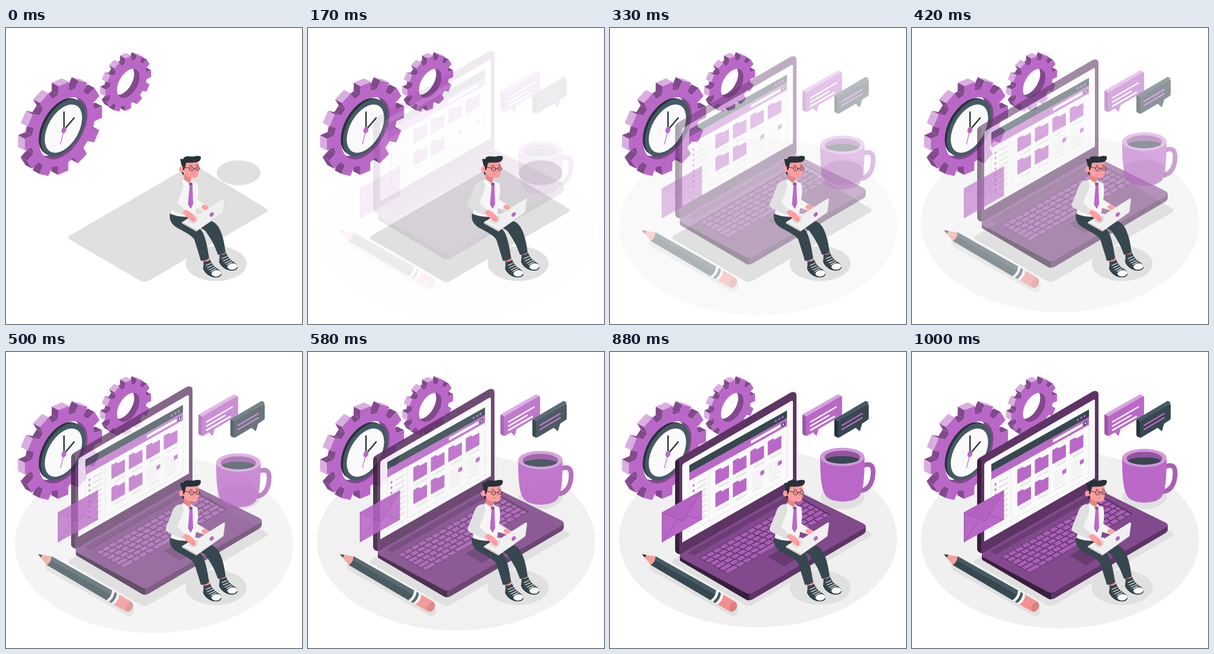
An HTML page that plays this animation: 500x500 px, repeating every 1.04 s.

```html
<!DOCTYPE html>
<html lang="en">
<head>
<meta charset="utf-8">
<title>Working on a laptop</title>
<style>
  html, body { margin: 0; width: 100%; height: 100%; overflow: hidden; background: #fff; }
  svg { display: block; width: 100%; height: 100%; }
  .line { fill: none; stroke-linecap: round; stroke-linejoin: round; }
</style>
</head>
<body>
<svg viewBox="0 0 500 500">
  <ellipse class="up" cx="250" cy="317" rx="235" ry="150" fill="#f0f0f0"/>

  <g fill="#e0e0e0">
    <path d="M107 351 L309 234 Q316 230 323 234 L440 305 Q444 308 440 311 L241 427 Q234 431 227 427 L107 357 Q103 354 107 351Z"/>
    <ellipse cx="393" cy="244.500" rx="37" ry="21"/>
    <ellipse cx="355" cy="398" rx="51.500" ry="29.500"/>
  </g>

  <g id="gears"></g>

  <g id="clock">
    <circle r="43" transform="matrix(.866 -.5 0 1 92.500 166.500)" fill="#263238"/>
    <circle r="43.500" transform="matrix(.866 -.5 0 1 96.500 168.500)" fill="#455a64"/>
    <circle r="36.500" transform="matrix(.866 -.5 0 1 97 170)" fill="#fafafa"/>
    <path class="line" d="M98 172 V142 M98 172 L115 152" stroke="#263238" stroke-width="2.400"/>
    <path class="line" d="M98 172 L92 196" stroke="#ba68c8" stroke-width="1.200"/>
    <ellipse cx="98" cy="172.500" rx="4" ry="5.500" transform="rotate(20 98 172)" fill="#ba68c8"/>
  </g>

  <g class="down">
    <path d="M110 187 Q110 181 115 178 L303 68 Q309 64 313 67 Q315 68 315 72 V230 L121 341 L115 339 Q110 337 110 332Z" fill="#5d3464"/>
    <path d="M110 187 Q110 182 113 180 L117 183 V340 L115 339 Q110 337 110 332Z" fill="#381f3c"/>
    <path d="M122 192 Q122 188 125 186 L306 81 Q309 79 309 83 V213 L122 320Z" fill="#fafafa"/>
    <g id="window" transform="matrix(1 -.56 0 1 134 189.400)"></g>
    <g transform="translate(0 -1)">
      <path d="M118 344 V350 Q118 352 122 354 L229 417 Q235 420 241 417 L428 307 Q432 304 432 301 V293Z" fill="#5d3464"/>
      <path d="M118 344 V350 Q118 352 122 354 L229 417 Q232 419 235 419 V405Z" fill="#381f3c"/>
      <path d="M122 339 L310 231 L428 289 Q436 294 428 298 L241 406 Q235 409 229 406 L121 348 Q114 343 122 339Z" fill="#82498c"/>
      <path d="M132 338 L308 237 L317 242 L142 343Z" fill="#6c3d75"/>
      <path d="M266 345 L304 323 L332 338 L294 361Z" fill="#683a70"/>
      <g id="keys" transform="matrix(1 -.575 1 .5625 151 347)"></g>
    </g>
  </g>

  <g class="fade">
    <path d="M88 271 L155 234 V283 L88 321Z" fill="#ba68c8" stroke="#ba68c8" stroke-linejoin="round"/>
    <path d="M88 271 L124 286 L155 234Z" fill="#b462c2"/>
    <path class="line" d="M90 272 L120 285 Q124 286 126 283 L155 235 M89 320 L114 283 M155 283 L130 276 M88.500 271 V321" stroke="#8d4f98" stroke-width=".8"/>
  </g>

  <g class="fade">
    <path d="M326 105 L384 72 Q386 71 391 74 L331 110Z" fill="#d6a4de"/>
    <path d="M325 107 Q325 105 327 106 L332 110 V142 L327 140 Q325 139 325 137Z" fill="#9b55a8"/>
    <path d="M341 134 L353 128 L349 142Z" fill="#ba68c8"/>
    <path d="M331 112 Q331 110 333 108 L389 75 Q392 74 392 77 V105 Q392 107 390 108 L334 141 Q331 143 331 140Z" fill="#ba68c8"/>
    <path class="line" d="M339 118 L382 93 M339 125 L370 107 M339 132 L379 109" stroke="#fff" stroke-width="2.600"/>
    <path d="M380 113 L431 83 Q433 82 437 86 L385 118Z" fill="#455a64"/>
    <path d="M379 115 Q379 113 381 114 L386 118 V145 L381 143 Q379 142 379 140Z" fill="#263238"/>
    <path d="M385 120 Q385 117 387 116 L434 88 Q437 86 437 90 V112 Q437 114 435 115 L426 121 L422 134 L415 128 L388 144 Q385 146 385 143Z" fill="#37474f"/>
    <path class="line" d="M392 124 L426 104 M392 131 L426 111" stroke="#ba68c8" stroke-width="2.400"/>
  </g>

  <g class="fade">
    <path class="line" d="M75 362 L208 437" stroke="#e0e0e0" stroke-width="18"/>
    <g transform="translate(54 341.500) rotate(30)">
      <path d="M0 0 L22 -8.500 Q26 0 22 8.500Z" fill="#f5a09a"/>
      <path d="M0 0 L7 -2.700 V2.700Z" fill="#263238"/>
      <path d="M22 -8.500 L140 -9.500 Q145 0 140 9.500 L22 8.500 Q26 0 22 -8.500Z" fill="#37474f"/>
      <path d="M22 -8.500 L140 -9.500 L142 -2 H24Z" fill="#455a64"/>
      <path d="M139 -9.500 H154 Q158 0 154 9.500 H139 Q144 0 139 -9.500Z" fill="#f5f5f5"/>
      <path d="M144 -9.500 H148.500 Q153 0 148.500 9.500 H144 Q148 0 144 -9.500Z" fill="#455a64"/>
      <path d="M153 -9.500 H177 Q184 -7 184 0 Q184 8 177 9.500 H153 Q158 0 153 -9.500Z" fill="#f28f8f"/>
      <ellipse cx="178" cy="0" rx="5.500" ry="8.500" fill="#d97f80"/>
    </g>
  </g>

  <g class="up">
    <path class="line" d="M428 193.500 C440 189 444.500 194 444.500 204 C444.500 222 437 236 422 236" stroke="#a85eb4" stroke-width="8"/>
    <path d="M355 179 C355 215 357 233 364 244 C374 258 412 258 422 244 C428 233 430 215 430 179Z" fill="#ba68c8"/>
    <ellipse cx="392.500" cy="179" rx="37.500" ry="15.500" fill="#d19ada"/>
    <ellipse cx="392.500" cy="179.500" rx="30" ry="11" fill="#9553a0"/>
    <path d="M364 183.500 C370 176 415 176 421 183.500 C414 192.500 371 192.500 364 183.500Z" fill="#37474f"/>
  </g>

  <g id="man">
    <path d="M331 385 L343 383 L344 396 L333 398Z M359 379 L370 376 L372 386 L361 388Z" fill="#f28f8f"/>
    <g id="shoe">
      <path d="M334 394 Q340 396 345 391 C347 400 355 405 361 409 C366 414 363 420 355 421 C345 422 335 414 333 406Z" fill="#37474f"/>
      <path d="M347 414 C350 409 356 408 361 410 C366 414 363 419 356 420 C351 420 347 418 347 414Z" fill="#fafafa"/>
      <path class="line" d="M333.500 406 C337 414 346 421 356 420.500 Q362 420 363.500 416" stroke="#263238" stroke-width="1.300"/>
      <path class="line" d="M338 401 L346 397.500 M340 405 L349 401 M343 408.500 L352.500 404 M346 411 L355 406.500" stroke="#fff" stroke-width="1.200"/>
    </g>
    <use href="#shoe" x="27" y="-11.500"/>
    <path d="M312 328 L336 342 C343 351 348 360 351 366 C354 372 356 378 358 383 Q365 383 371 379 C369 364 366 349 360 338 C354 327 345 324 336 324Z" fill="#37474f"/>
    <path d="M277 313 C275 326 281 333 290 338 C303 345 313 350 318 357 C322 370 326 382 329 393 Q337 394 343 389 C341 374 338 357 333 347 C325 335 315 324 318 315Z" fill="#37474f"/>
    <path class="line" d="M333 347 C328 339 324 336 319 332" stroke="#263238" stroke-width=".9"/>

    <path d="M295 258 L314 259 L323 262 Q326 275 323 290 L344 303 L338 309 L321 304 L319 317 Q297 322 278 314 L282 296Z" fill="#f5f5f5"/>
    <path d="M301 245 L313 249 L312 260 Q306 263 300 257Z" fill="#e98684"/>
    <path d="M299 255 L309 262 L306 268 L297 260Z M313 256 L316 261 L317 267 L312 262Z" fill="#fff" stroke="#e0e0e0" stroke-width=".5"/>
    <path d="M308.500 262 L314.500 261 L315 266 L316 296 L312 304.500 L307.500 297 L310 266Z" fill="#ba68c8"/>
    <path d="M308.500 262 L314.500 261 L315 266 L310 266Z" fill="#8d4f98"/>
    <path class="line" d="M307.500 297 L312 304.500 L316 296" stroke="#8d4f98" stroke-width=".8"/>

    <path d="M299 233 C301 226 312 225 325 227 C327 234 326 244 324 250 C322 254 314 254 307 251 C302 249 300 244 299 233Z" fill="#ff9ea0"/>
    <ellipse cx="296.500" cy="239" rx="4.300" ry="5" fill="#ff9ea0"/>
    <path d="M299 235 C295 232 296 226 294 222 Q297 220 299 222 C301 214 312 218 318 217 Q324 215 329 217 C330 223 326 227 319 227 C313 228 307 227 304 228 L303 233 L301 240 L299 240Z" fill="#263238"/>
    <path d="M297 243 L300 244 V249 Q297 247 297 243Z" fill="#263238"/>
    <g class="line" stroke="#263238" stroke-width=".9">
      <circle cx="313.500" cy="238" r="3.600"/>
      <circle cx="324" cy="237.500" r="3.200"/>
      <path d="M300 235 L310 236.500 M317 237.500 L321 237 M310.500 232.500 L314 232 M321 231.500 L325 232.500"/>
    </g>
    <circle cx="313.500" cy="238" r=".8" fill="#263238"/>
    <circle cx="323.500" cy="237.500" r=".8" fill="#263238"/>
    <path class="line" d="M319 238 L320.500 242 L318 242.500 M313 246.500 Q316 248 318 246" stroke="#d9706f" stroke-width=".7"/>

    <path d="M331 300 C335 297 341 300 343 304 L338 309 L330 304Z" fill="#ff9ea0"/>
    <path d="M297 328 L322 313 L347 326 L322 342Z" fill="#f0f0f0"/>
    <path d="M297 328 L322 341 V344 L297 330Z" fill="#d0d0d0"/>
    <path d="M306 326 L322 317 L331 322 L316 331Z" fill="#dedede"/>
    <path d="M297 257 C287 257 283 263 280 272 L270 297 C269 302 272 304 277 306 L298 316 L304 309 L289 295 L297 277 Q302 262 297 257Z" fill="#e0e0e0"/>
    <path d="M299 259 Q303 268 296 281 L290 295 L304 309 L307 300 L303 268Z" fill="#f5f5f5"/>
    <path d="M298 312 L303 307 C309 309 315 313 318 317 C321 321 322 325 319 327 C315 329 312 324 307 321Z" fill="#ff9ea0"/>
    <path class="line" d="M314 322 L318 325" stroke="#d9706f" stroke-width=".7"/>
    <path d="M325 315 L367 288.500 Q370 287 370 290 L367 311 L322 343Z" fill="#f0f0f0"/>
    <path class="line" d="M369.500 290 L367 311 L322 343" stroke="#d6d6d6" stroke-width="1"/>
    <ellipse cx="347.500" cy="315" rx="3" ry="4.300" transform="rotate(40 347.500 315)" fill="#ba68c8"/>
  </g>
</svg>

<script>
const $ = id => document.getElementById(id);
const rect = (x, y, w, h, fill) =>
  `<rect x="${x}" y="${y}" width="${w}" height="${h}" fill="${fill}"/>`;
const poly = (points, fill) =>
  `<path d="M${points.map(p => p.map(n => n.toFixed(2))).join('L')}Z" fill="${fill}"/>`;

const PURPLE = '#ba68c8', DARK = '#82498c', LIGHT = '#d9aee0', GREY = '#e3e3e3';

// An extruded gear with twelve teeth on a tilted ellipse; size is its long half axis
function gear({ id, x, y, size, hole, dx, dy }) {
  const FLAT = .655, ROOT = .81, PHASE = 19;
  const at = (deg, scale) => {
    const a = deg * Math.PI / 180;
    const u = size * scale * Math.cos(a), v = size * scale * FLAT * Math.sin(a);
    return [x + .5 * u + .866 * v, y - .866 * u + .5 * v];
  };
  const shift = ([px, py]) => [px + dx, py + dy];
  const outline = [];
  for (let i = 0; i < 12; i++) {
    const a = PHASE + i * 30;
    outline.push(at(a - 9.5, ROOT), at(a - 7.5, 1), at(a + 7.5, 1), at(a + 9.5, ROOT));
  }
  const sides = [], tips = [];
  outline.forEach((p, i) => {
    const q = outline[(i + 1) % outline.length];
    if ((q[1] - p[1]) * dx - (q[0] - p[0]) * dy <= 0) return;
    const isTip = i % 4 === 1, lit = isTip && PHASE + Math.floor(i / 4) * 30 > 210;
    (isTip ? tips : sides).push(poly([p, q, shift(q), shift(p)], lit ? LIGHT : DARK));
  });
  const disk = (cx, cy, extra) =>
    `<circle r="${hole}" transform="matrix(.866 -.5 0 1 ${cx} ${cy})" ${extra}/>`;
  return sides.join('') + tips.join('') + poly(outline, PURPLE) +
    `<clipPath id="${id}">${disk(x, y, '')}</clipPath>` + disk(x, y, `fill="${DARK}"`) +
    `<g clip-path="url(#${id})">${disk(x + dx, y + dy, 'fill="#fff"')}</g>`;
}

$('gears').innerHTML =
  gear({ id: 'small', x: 206.5, y: 93.5, size: 51.5, hole: 22, dx: -9, dy: -5 }) +
  gear({ id: 'big', x: 97, y: 169.5, size: 87, hole: 47, dx: -11.5, dy: -6 });

function drawWindow() {
  let s = rect(0, 26, 165, 88, '#fafafa" stroke="#e0e0e0" stroke-width=".8') +
    rect(0, 0, 165, 13, '#37474f') + rect(0, 13, 165, 13, PURPLE) +
    rect(104, 17, 50, 5, '#fff') + rect(156.5, 17, 5, 6, '#37474f') +
    rect(158, 18.5, 2, 3, '#fff') + rect(33, 26, .8, 88, GREY);
  for (const x of [146, 152, 157.5]) s += `<ellipse cx="${x}" cy="7" rx="1.7" ry="2" fill="${PURPLE}"/>`;
  for (let i = 0; i < 8; i++) {
    const y = 38 + i * 9;
    s += `<ellipse cx="7" cy="${y}" rx="1.6" ry="2" fill="${PURPLE}"/>` + rect(13, y - 1.5, 16, 3, GREY);
  }
  for (let i = 0; i < 8; i++) {
    const x = 44 + i % 4 * 29.5, y = i < 4 ? 34 : 72;
    if (i < 6) {
      s += `<path d="M${x} ${y + 1}q0-1 1-1h8l2 3h11q1 0 1 1v19q0 1-1 1h-21q-1 0-1-1z" fill="${PURPLE}"/>` +
        rect(x + 5, y + 30, 18, 2.5, GREY);
    } else {
      for (let k = 0; k < 7; k++) s += rect(x + 2, y + 2 + k * 4, k < 3 ? 13 : 18, 1, GREY);
      s += rect(x + 17, y + 6, 6.5, 7, PURPLE) + rect(x + 4, y + 31, 17, 2, GREY);
    }
  }
  return s;
}
$('window').innerHTML = drawWindow();

function drawKeys() {
  let s = rect(0, 0, 174, 48, '#5d3464');
  const key = (x, w, row) => rect(x, row * 8 + .8, w - 1.6, 6.4, '#a95fb6');
  for (let row = 0; row < 6; row++) {
    let x = 1;
    while (x < 172) {
      let w = x === 1 ? 9 + row * 2 : 11.6;
      if (row === 5 && x > 45 && x < 60) w = 52;
      if (173 - x - w < 6) w = 173 - x;
      s += key(x, w, row);
      x += w;
    }
  }
  return s;
}
$('keys').innerHTML = drawKeys();

// cubic-bezier(.36, -.01, .5, 1.38)
function ease(t) {
  const curve = (a, b, s) => 3 * a * s * (1 - s) ** 2 + 3 * b * s * s * (1 - s) + s ** 3;
  let lo = 0, hi = 1;
  for (let i = 0; i < 24; i++) {
    const mid = (lo + hi) / 2;
    if (curve(.36, .5, mid) < t) lo = mid; else hi = mid;
  }
  return curve(-.01, 1.38, lo);
}

const LOOP = 1040, FPS = 24, TRAVEL = 30;
const movers = [['.up', 1], ['.down', -1], ['.fade', 0]]
  .flatMap(([sel, dir]) => [...document.querySelectorAll(sel)].map(el => ({ el, dir })));
const start = performance.now();

function draw(now) {
  const t = Math.max(0, now - start) % LOOP;
  const step = Math.min(FPS, Math.floor((t + 4) * FPS / 1000));
  const e = ease(step / FPS);
  for (const { el, dir } of movers) {
    el.setAttribute('opacity', Math.min(1, Math.max(0, e)));
    el.setAttribute('transform', `translate(0 ${dir * TRAVEL * (1 - e)})`);
  }
  requestAnimationFrame(draw);
}
draw(start);
</script>
</body>
</html>
```
